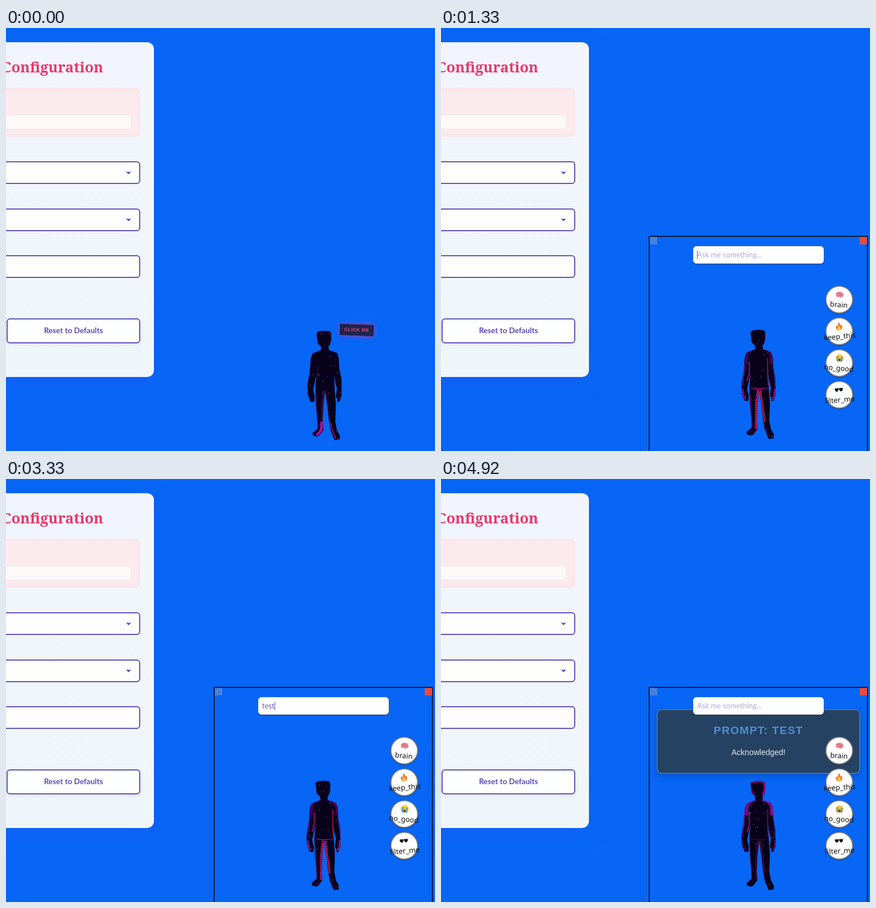
These frames come from a looping animation (754 px wide and 743 px high, 5 s). An HTML page with a canvas:

```html
<!DOCTYPE html>
<html lang="en">
<head>
<meta charset="utf-8">
<title>Assistant configuration</title>
<style>
html, body { margin: 0; width: 100%; height: 100%; overflow: hidden; background: #0766f5; }
body { position: relative; font-family: Lato, sans-serif; }
body *, canvas { box-sizing: border-box; }
div, canvas, svg { position: absolute; }
canvas, svg, .layer { left: 0; top: 0; width: 754px; height: 743px; }

#card { left: -400px; top: 25px; width: 660px; height: 588px; border-radius: 12px;
  background: linear-gradient(#f2f5fd, #eff6fa); box-shadow: 0 8px 30px rgba(28, 92, 250, .5); }
#card div { right: 24px; }
#card #title { right: 89px; top: 25px; font: bold 25.4px/36px "Noto Serif", serif; color: #e8376b; }
#notice { top: 80px; width: 630px; height: 86px; border-radius: 9px; background: #fbebee;
  box-shadow: inset 0 0 8px rgba(255, 185, 198, .28); }
#card #bar { right: 39px; top: 127px; width: 600px; height: 26px; border-radius: 6px;
  background: #fcfaf9; border: 1px solid #f8e0e3; }
.field { width: 600px; height: 40px; border: 2px solid #6355bc; border-radius: 6px; background: #fdfefc; }
#reset { top: 485px; width: 235px; height: 44px; border: 2px solid #6355bc; border-radius: 6px;
  background: #fdfefe; color: #5b4bb8; font-weight: 700; font-size: 13.5px; line-height: 39px;
  text-align: center; box-shadow: 0 2px 6px rgba(90, 80, 180, .12); }

#tip { left: 586px; top: 520px; width: 61px; height: 21px; transform: rotate(2deg);
  background: #1c254e; border: 1px solid #65367c; border-radius: 2px; color: #e8436f;
  font: bold 8.5px/19px "Liberation Sans", sans-serif; letter-spacing: .4px; text-align: center;
  box-shadow: 0 0 8px rgba(190, 60, 180, .75); }

.handle { top: 367px; width: 13px; height: 13px; }
#answer { left: 379px; top: 404px; width: 358px; height: 114px; border: 2px solid #44749f;
  border-radius: 9px; background: #264262; text-align: center; box-shadow: 0 4px 10px rgba(0, 20, 80, .25);
  font-family: "Liberation Sans", sans-serif; }
#answer div { width: 100%; }
#heading { top: 25px; font: bold 19.2px/22px "Liberation Sans", sans-serif; letter-spacing: 1.4px; color: #4e8fd5; }
#reply { top: 65px; font-size: 14px; line-height: 18px; color: #e0e7ee; }
#ask { left: 443px; top: 383px; width: 230px; height: 31px; padding-left: 6px; border: 1px solid #d5d8de;
  border-radius: 6px; background: #fdfefe; font-size: 13px; line-height: 29px; white-space: nowrap;
  box-shadow: 0 1px 2px rgba(40, 40, 40, .65); }
#caret { display: inline-block; width: 1px; height: 15px; margin-right: -1px; vertical-align: -3px; background: #5b4db8; }
#hint { color: #aeaae0; }
#typed { color: #685bbd; }
.disc { fill: #fdfefe; stroke: #77777c; stroke-width: 1.7; filter: drop-shadow(0 1px 1px rgba(30, 30, 30, .45)); }
text { font: 12.7px "Noto Sans", sans-serif; text-anchor: middle; fill: #101010; }
</style>
</head>
<body>
<div id="card">
  <div id="title">Configuration</div>
  <div id="notice"></div><div id="bar"></div>
  <div class="field" style="top:209px"></div>
  <div class="field" style="top:292px"></div>
  <div class="field" style="top:374px"></div>
  <div id="reset">Reset to Defaults</div>
</div>
<svg fill="#5b4db8">
  <path id="arrow" d="M210.5 252 Q215.5 253.5 220 252 L215.5 257Z"/>
  <use href="#arrow" y="82.5"/>
</svg>
<canvas id="figure" width="754" height="743"></canvas>
<div id="tip">CLICK ME</div>

<div id="popup" class="layer">
  <svg><rect x="366" y="366" width="383.500" height="400" fill="none" stroke="#05080f" stroke-width="1.600"/></svg>
  <div class="handle" style="left:367px;background:#4781de"></div>
  <div class="handle" style="left:736px;background:#e74b3d"></div>
  <div id="answer"><div id="heading">PROMPT: TEST</div><div id="reply">Acknowledged!</div></div>
  <div id="ask"><span id="typed"></span><span id="caret"></span><span id="hint">Ask me something...</span></div>
  <svg>
    <g class="choice"><circle class="disc" r="23.5"/>
      <g transform="translate(0 -8.5)">
        <path fill="#ef8c9d" d="M-7 1 Q-7 -5 -1 -5.5 Q6 -6 7 0 Q7 4 3 4 L2 6 L0 4 Q-6 5 -7 1Z"/>
        <path fill="none" stroke="#c9586f" d="M-5 0 Q-3 -4 0 -2 T5 -1 M-3 3 Q0 -1 4 2"/>
      </g><text y="13.5">brain</text></g>
    <g class="choice"><circle class="disc" r="23.5"/>
      <g transform="translate(0 -8.5)">
        <path fill="#f4762b" d="M-1 -8 Q3 -5 3 -1 L4.5 -3 Q7 2 4 5.5 Q0 9 -4 5.5 Q-7 1 -3.5 -3 L-3 0 Q0 -3 -1 -8Z"/>
        <path fill="#fdd044" d="M0 -1 Q4 3 2.5 6 Q0 8 -2.5 6 Q-4 3 0 -1Z"/>
      </g><text y="13.5">keep_this</text></g>
    <g class="choice"><circle class="disc" r="23.5"/>
      <g transform="translate(0 -8.5)">
        <circle r="7" fill="#fbc93c"/>
        <path fill="#4ba4e8" d="M-5 -1h3v7q-2 1-3-1z M2 -1h3v6q-1 2-3 1z"/>
        <path fill="none" stroke="#6b4528" d="M-5 -2h3 M2 -2h3"/>
        <ellipse cy="3" rx="2" ry="2.2" fill="#6b3a27"/>
      </g><text y="13.5">no_good</text></g>
    <g class="choice"><circle class="disc" r="23.5"/>
      <path fill="#15191d" transform="translate(0 -8.5)" d="M-7 -3H-1L0 -2L1 -3H7V0Q6 3 3 3Q1 2 .5 -1H-.5Q-1 2 -3 3Q-6 3 -7 0Z"/>
      <text y="13.5">filter_me</text></g>
  </svg>
</div>

<script>
const $ = id => document.getElementById(id);
const LOOP = 5000, STEPS = 60, OPEN = 250, FOCUS = 1050, SUBMIT = 3750, ANSWER = 4500;
const KEYS = [2830, 2920, 3080, 3250];
const ctx = $('figure').getContext('2d');
const choices = [...document.querySelectorAll('.choice')];

const body = new Path2D(`
  M544 534 L548 531 L558 530 L568 531 L570 535 L570 546 L568 554 L565 558 L566 564
  L580 569 L583 577 L584 596 L588 616 L588 645 L584 655 L580 655 L581 651 L578 646
  L580 632 L577 620 L575 606 L576 632 L578 661 L577 690 L580 705 L585 714 L585 721
  L576 722 L572 713 L569 705 L566 688 L563 662 L559 635 L556 662 L555 690 L556 705
  L549 714 L545 716 L538 714 L537 710 L546 702 L545 684 L543 661 L542 632 L544 606
  L541 620 L538 634 L541 646 L540 655 L534 655 L529 644 L528 626 L532 602 L534 578
  L537 570 L552 564 L552 558 L546 552 L545 543Z`);

// Lit edges: polyline, width in px, time of peak brightness, colour
const lights = [
  ['545 533 556 531 568 532 569 546 565 556', 3, 650, '#f315ce'],
  ['546 544 547 552 554 558', 2, 650, '#b0168f'],
  ['552 562 541 568 537 576 536 591', 6, 900, '#a30bb9'],
  ['565 562 577 568 581 576 581 590', 5, 900, '#b20cb5'],
  ['534 592 532 609 529 629', 2, 1150, '#8a14c4'],
  ['542 586 542 606 538 620', 2, 1150, '#c31a86'],
  ['584 594 587 616 588 630', 2, 1150, '#7e18c9'],
  ['574 580 574 604 575 628', 1.5, 1200, '#de1c50'],
  ['530 634 531 645 536 652', 3, 1350, '#9c18bd'],
  ['587 634 586 646 582 653', 3, 1350, '#b71893'],
  ['544 632 558 634 575 632', 1.5, 1350, '#c3168d'],
  ['557 636 554 662 554 704', 3.5, 1480, '#ee1a72'],
  ['561 636 565 664 569 692', 3, 1400, '#ed1b58'],
  ['544 645 545 675 547 700', 1.5, 1600, '#a012b0'],
  ['553 690 552 705 544 714', 4, 1950, '#e31ad0'],
  ['567 690 573 708 578 720', 2, 1850, '#c51895'],
].map(([points, ...rest]) => [new Path2D('M' + points), ...rest]);

const rng = seed => () => {
  seed = (seed * 1664525 + 1013904223) >>> 0;
  return seed / 4294967296;
};
const pulse = (t, peak) => .5 + .5 * Math.cos(Math.PI * (t - peak) / 1000);

function drawFigure(t, step) {
  const offset = t < OPEN ? 1.7 : 0;
  const random = rng(9173 + step * 811);
  ctx.clearRect(500, 510, 120, 233);
  ctx.save();
  ctx.translate(offset, offset);
  ctx.fillStyle = '#08011e';
  ctx.fill(body);
  ctx.clip(body);
  for (const [path, width, peak, colour] of lights) {
    const level = pulse(t, peak);
    ctx.strokeStyle = colour;
    ctx.globalAlpha = .9 * level ** 1.5;
    ctx.lineWidth = width * (.5 + .5 * level);
    ctx.setLineDash([]);
    ctx.stroke(path);
    // Ragged dotted fringe around each lit edge
    ctx.globalAlpha *= .4;
    ctx.lineWidth = width * 2;
    ctx.setLineDash([1, 2]);
    ctx.stroke(path);
  }
  ctx.globalAlpha = .55;
  ctx.fillStyle = '#05000f';
  for (let y = 530; y < 724; y += 3) ctx.fillRect(526, y, 66, 1);
  ctx.globalAlpha = .75;
  for (let i = 0; i < 50; i++) {
    ctx.fillStyle = ['#d6318f', '#9a3cd0', '#c08a50', '#4aa57c', '#c890c0'][i % 5];
    ctx.fillRect(528 + random() * 60, 534 + random() * 186, 1.3, 1.3);
  }
  ctx.restore();
}

function render(now) {
  const step = Math.floor((now % LOOP + 5) * STEPS / LOOP) % STEPS;
  const t = step * LOOP / STEPS + 1;
  const open = t >= OPEN;
  $('tip').style.display = open ? 'none' : '';
  $('popup').style.display = open ? '' : 'none';

  const letters = t < SUBMIT ? KEYS.filter(key => t >= key).length : 0;
  const blinkFrom = t >= SUBMIT ? SUBMIT : letters ? KEYS[letters - 1] : FOCUS;
  const caretOn = t >= FOCUS && t < ANSWER && (t - blinkFrom) % 1000 < 500;
  $('typed').textContent = 'test'.slice(0, letters);
  $('hint').style.display = letters ? 'none' : '';
  $('caret').style.visibility = caretOn ? '' : 'hidden';

  const shown = Math.min(1, Math.max(0, (t - ANSWER) / 300));
  $('answer').style.opacity = shown;
  $('answer').style.transform = `translateY(${-10 * (1 - shown) ** 2}px)`;

  const tilt = 5 * pulse(t, 1300);
  choices.forEach((choice, i) =>
    choice.setAttribute('transform', `translate(700 ${477 + i * 55.7}) rotate(${i % 2 ? -tilt : tilt})`));

  drawFigure(t, step);
  requestAnimationFrame(render);
}
requestAnimationFrame(render);
</script>
</body>
</html>
```
